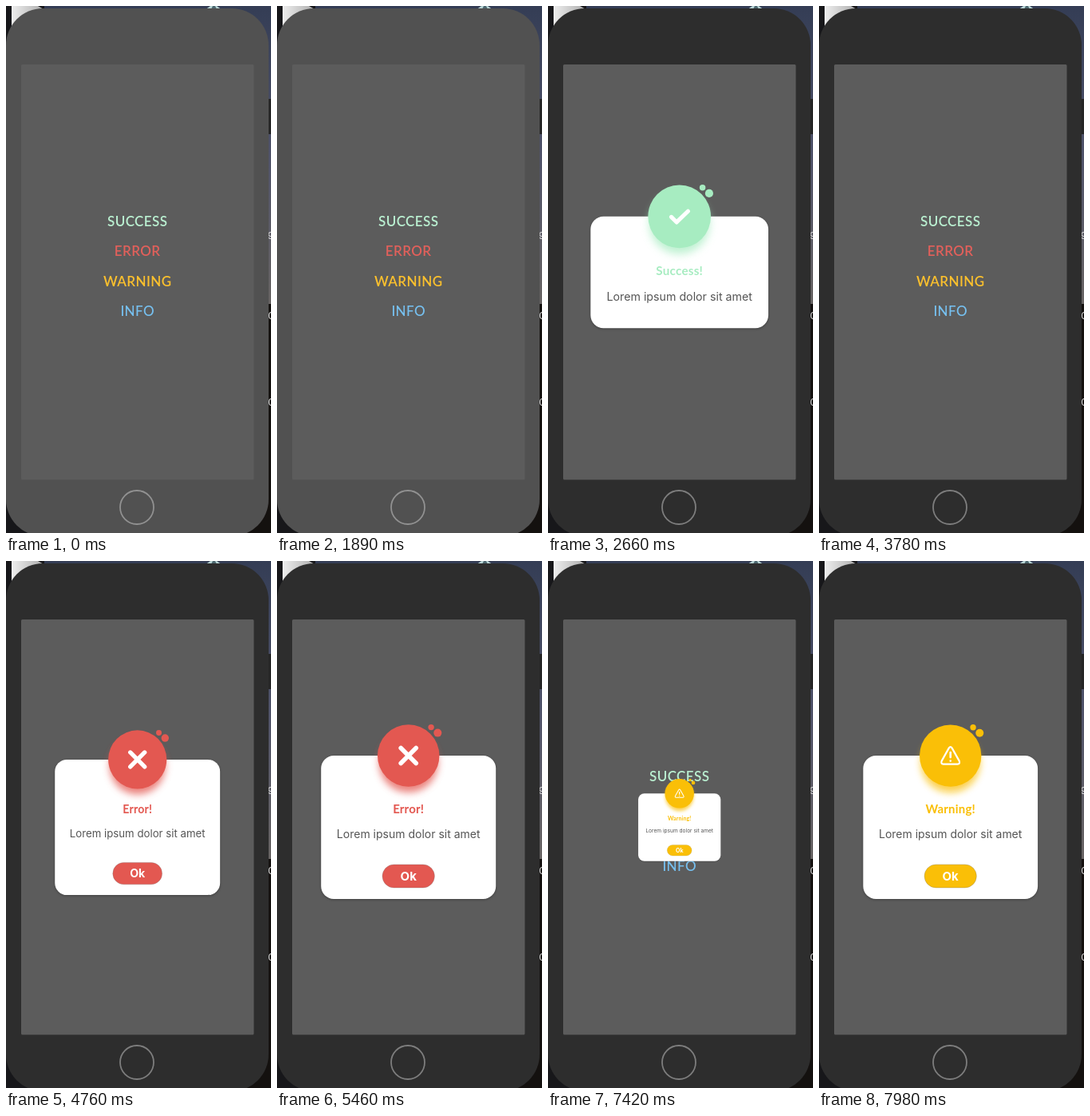
Recreate the animation shown at these times as an HTML page. Size 332x658 px, loop 8000 ms.

```html
<!DOCTYPE html>
<html lang="en">
<head>
<meta charset="utf-8">
<title>Alert dialogs</title>
<style>
  html, body { margin: 0; width: 100%; height: 100%; overflow: hidden; background: #17171a; }
  svg { display: block; width: 332px; height: 658px; }
  text { text-anchor: middle; }
  .menu { font: 600 17px Lato, "Open Sans", sans-serif; letter-spacing: .4px; }
  .title { font: 700 15px Lato, "Open Sans", sans-serif; letter-spacing: .2px; }
  .message { font: 400 14px Inter, Roboto, sans-serif; fill: #555; }
  .ok { font: 700 15px Inter, Roboto, sans-serif; fill: #fff; }
  .backdrop text { font: 12px Inter, sans-serif; fill: #ddd; }
  .card { filter: drop-shadow(0 1px 1.5px rgba(0, 0, 0, .3)); }
  .icon { fill: none; stroke: #fff; stroke-linecap: round; stroke-linejoin: round; }
</style>
</head>
<body>
<svg viewBox="0 0 332 658">
  <defs>
    <linearGradient id="paper">
      <stop offset="0" stop-color="#eee"/>
      <stop offset="1" stop-color="#aaa"/>
    </linearGradient>
    <linearGradient id="sky" x2="0" y2="1">
      <stop offset="0" stop-color="#343d55"/>
      <stop offset=".5" stop-color="#50536a"/>
      <stop offset="1" stop-color="#686463"/>
    </linearGradient>
    <filter id="glow" x="-50%" y="-50%" width="200%" height="200%">
      <feGaussianBlur stdDeviation="5"/>
    </filter>
  </defs>

  <g class="backdrop">
    <path fill="url(#sky)" d="M48 0H332V372H48Z"/>
    <path fill="url(#paper)" d="M7 0H40L49 5V40H7Z"/>
    <path fill="#b9d6d6" d="M256 0H264L271 5H249Z"/>
    <path fill="#4d6870" d="M259 0H262L264 4H257Z"/>
    <path fill="#14110f" d="M300 372H332V658H300Z"/>
    <path fill="#262626" d="M322 116H332V160H322Z"/>
    <text x="331.5" y="291">9</text>
    <text x="332" y="391">0</text>
    <text x="332" y="499">0</text>
  </g>

  <rect id="phone" y="3" width="329" height="659" rx="46"/>
  <rect x="19" y="73" width="291.5" height="518.5" rx="1.5" fill="#5c5c5c"/>
  <circle id="home" cx="164" cy="626" r="21" fill="none" stroke-width="1.8"/>

  <g class="menu">
    <text x="164.7" y="275" fill="#b9efd0">SUCCESS</text>
    <text x="164.7" y="312" fill="#e2605b">ERROR</text>
    <text x="164.7" y="349.5" fill="#fbc02d">WARNING</text>
    <text x="164.7" y="387" fill="#76c0f0" font-weight="500" style="font-weight:500">INFO</text>
  </g>

  <g id="dialogs"></g>
</svg>
<script>
  const LOOP = 8000;
  const CENTER = "164.7 332.5";
  const $ = id => document.getElementById(id);

  const dialogs = [
    {
      title: "Success!", color: "#a7ecc1", height: 137, open: 2260, close: 3290,
      icon: '<path stroke-width="5" d="M-10 .5L-3.5 7L10.5-6.5"/>'
    },
    {
      title: "Error!", color: "#e35851", height: 179, open: 4565, close: 5740, ok: true,
      icon: '<path stroke-width="5.6" d="M-9.5-9.5L9.5 9.5M9.5-9.5L-9.5 9.5"/>'
    },
    {
      title: "Warning!", color: "#fabf07", height: 179, open: 7330, close: LOOP, ok: true,
      icon: '<path stroke-width="2.2" d="M-2-9.5Q0-12.5 2-9.5L11 6.5Q12.5 10.5 9 10.5H-9Q-12.5 10.5-11 6.5Z"/>' +
            '<path stroke-width="2.6" d="M0-4V2M0 6.4V6.5"/>'
    }
  ];

  // Coordinates are relative to the centre of the card.
  function dialogMarkup({ title, color, height, icon, ok }) {
    const top = -height / 2;
    const button = ok ? `
      <rect x="-32.7" y="46.5" width="65.4" height="29" rx="14.5" fill="${color}"
        stroke="#777" stroke-opacity=".4" stroke-width=".8"/>
      <text class="ok" y="66.5">Ok</text>` : "";
    return `
      <rect class="card" x="-109.5" y="${top}" width="219" height="${height}" rx="16" fill="#fff"/>
      <g transform="translate(0 ${top})" fill="${color}">
        <circle cy="9" r="37" filter="url(#glow)" opacity=".75"/>
        <circle r="38.7"/>
        <circle cx="28.4" cy="-35.4" r="3.7"/>
        <circle cx="36.6" cy="-28.4" r="5"/>
        <g class="icon">${icon}</g>
        <text class="title" y="71.5">${title}</text>
        <text class="message" y="103">Lorem ipsum dolor sit amet</text>
      </g>${button}`;
  }

  for (const d of dialogs) {
    d.node = document.createElementNS("http://www.w3.org/2000/svg", "g");
    d.node.innerHTML = dialogMarkup(d);
    $("dialogs").append(d.node);
  }

  const clamp = x => Math.min(1, Math.max(0, x));

  // Underdamped spring from 0 to 1, time in seconds.
  function spring(s) {
    const decay = 11, freq = 10.45;
    return 1 - Math.exp(-decay * s) * (Math.cos(freq * s) + decay / freq * Math.sin(freq * s));
  }

  function scaleAt(d, t) {
    if (t < d.open) return 0;
    if (t < d.close) return spring((t - d.open) / 1000);
    return 1 - clamp((t - d.close) / 250) ** 2;
  }

  function grey(from, to, k) {
    const v = Math.round(from + (to - from) * k);
    return `rgb(${v},${v},${v})`;
  }

  function draw(now) {
    const t = now % LOOP;
    const dim = clamp((t - 1960) / 180);
    $("phone").setAttribute("fill", grey(81, 45, dim));
    $("home").setAttribute("stroke", grey(145, 125, dim));
    for (const d of dialogs) {
      const scale = scaleAt(d, t);
      d.node.setAttribute("visibility", scale > 0.001 ? "visible" : "hidden");
      d.node.setAttribute("transform", `translate(${CENTER}) scale(${scale.toFixed(4)})`);
    }
  }

  const start = performance.now();
  function tick() {
    draw(performance.now() - start);
    requestAnimationFrame(tick);
  }
  tick();
</script>
</body>
</html>
```
